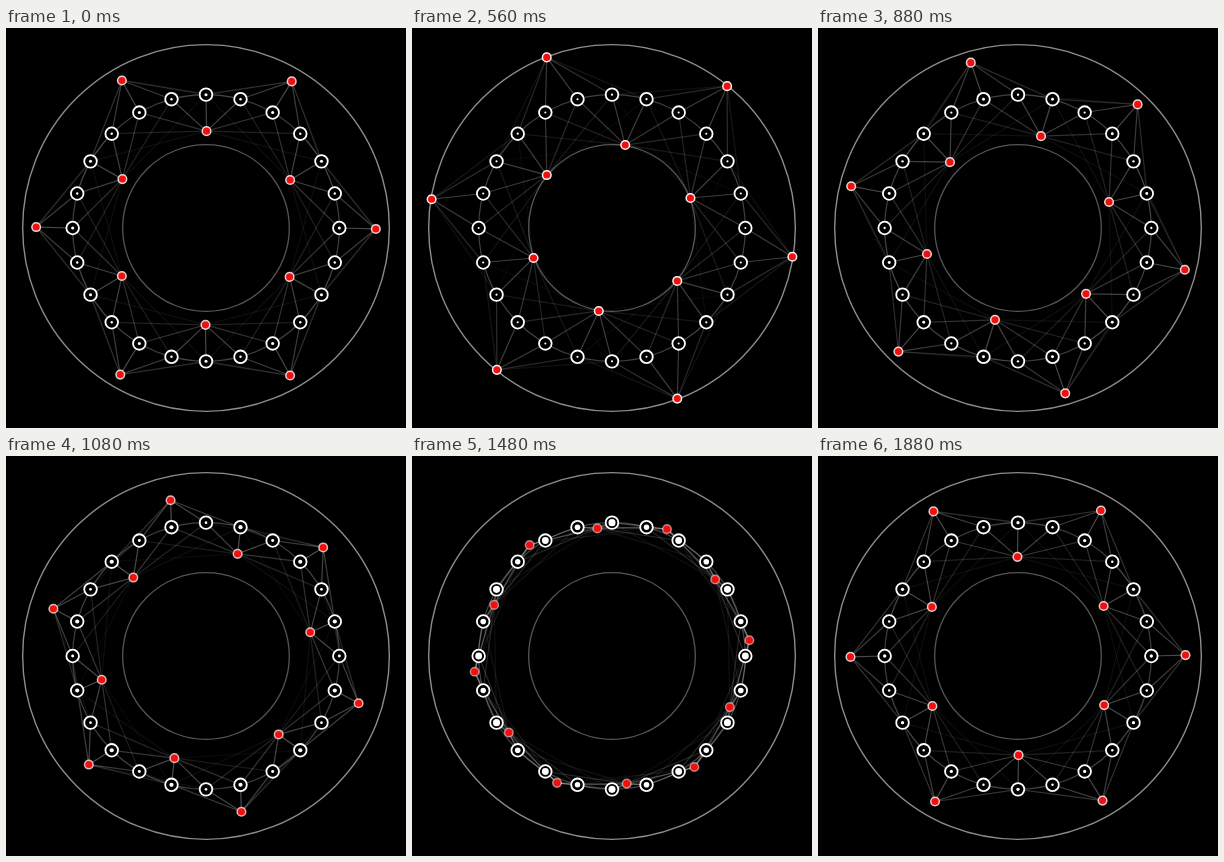
Animation of 400 by 400 pixels, one loop 1920 ms. Source, as an HTML page with a canvas:

```html
<!DOCTYPE html>
<html lang="en">
<head>
<meta charset="utf-8">
<title>Orbiting nodes</title>
<style>
  html, body { margin: 0; width: 100%; height: 100%; overflow: hidden; background: #000; }
  canvas { display: block; width: 400px; height: 400px; }
</style>
</head>
<body>
<canvas id="stage" width="400" height="400"></canvas>
<script>
const ctx = document.getElementById('stage').getContext('2d');
const LOOP = 1920, STEP = 40;
const CENTER = 200, RING = 400 / 3, SWING = 50;
const REACH = 140;

const polar = (deg, r) => {
  const a = deg * Math.PI / 180;
  return { x: CENTER + r * Math.cos(a), y: CENTER + r * Math.sin(a) };
};
const nodes = Array.from({ length: 24 }, (_, i) => polar(i * 15, RING));

function circle(x, y, r, fill, stroke, width) {
  ctx.beginPath();
  ctx.arc(x, y, r, 0, Math.PI * 2);
  if (fill) {
    ctx.fillStyle = fill;
    ctx.fill();
  }
  if (stroke) {
    ctx.strokeStyle = stroke;
    ctx.lineWidth = width;
    ctx.stroke();
  }
}

function link(a, b) {
  const d = Math.hypot(a.x - b.x, a.y - b.y);
  if (d >= REACH) return;
  ctx.strokeStyle = `rgba(255,255,255,${0.38 * (1 - d / REACH)})`;
  ctx.lineWidth = 1.2;
  ctx.beginPath();
  ctx.moveTo(a.x, a.y);
  ctx.lineTo(b.x, b.y);
  ctx.stroke();
}

function draw(ms) {
  // The motion advances in discrete steps, each posed at its midpoint.
  const p = (Math.floor((ms % LOOP) / STEP) + 0.5) * STEP / LOOP;
  const swing = SWING * Math.cos(Math.PI * (p - 0.25));
  const dots = Array.from({ length: 12 }, (_, i) =>
    polar((i + p) * 30, RING + (i % 2 ? -swing : swing)));

  ctx.fillStyle = '#000';
  ctx.fillRect(0, 0, 400, 400);

  circle(CENTER, CENTER, RING + SWING, null, '#8c8c8c', 1.4);
  circle(CENTER, CENTER, RING, null, '#404040', 1.2);
  circle(CENTER, CENTER, RING - SWING, null, '#555', 1.3);

  for (const dot of dots) for (const node of nodes) link(dot, node);

  for (const n of nodes) {
    const near = Math.min(...dots.map(d => Math.hypot(d.x - n.x, d.y - n.y)));
    circle(n.x, n.y, 6.3, '#000', '#fff', 1.8);
    circle(n.x, n.y, Math.max(1, Math.min(3.7, 56 / near)), '#fff');
  }

  const rim = 0.45 + 0.5 * Math.abs(swing) / SWING;
  for (const d of dots) circle(d.x, d.y, 4.3, '#f00f0f', `rgba(255,255,255,${rim})`, 1.5);
}

const start = performance.now();
function tick() {
  draw(performance.now() - start);
  requestAnimationFrame(tick);
}
tick();
</script>
</body>
</html>
```
